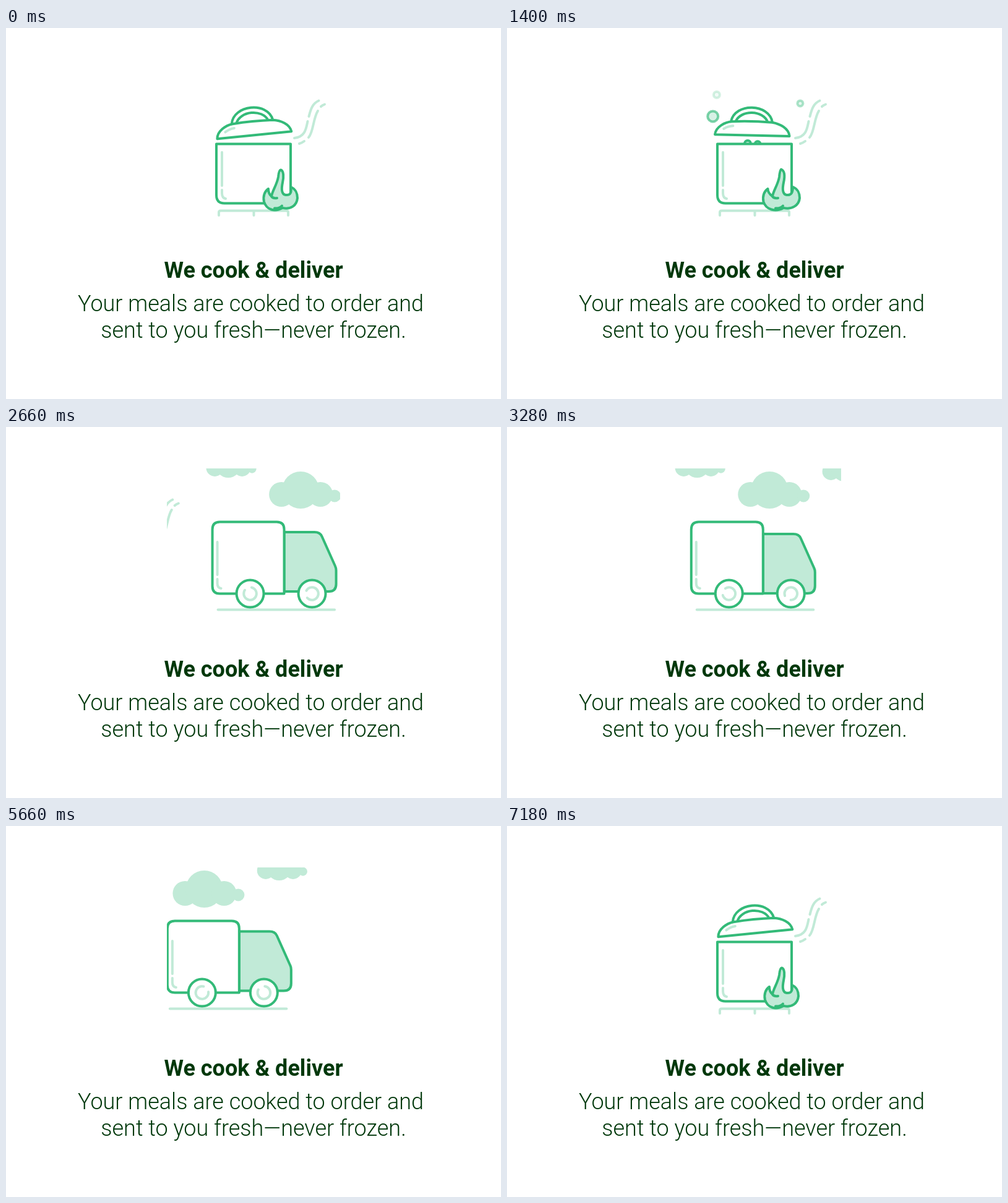
These frames come from a looping animation (800 by 600 pixels, 7200 ms). An HTML page with a canvas:

```html
<!DOCTYPE html>
<html lang="en">
<head>
<meta charset="utf-8">
<title>We cook &amp; deliver</title>
<style>
  html, body { margin: 0; width: 100%; height: 100%; overflow: hidden; background: #fff; }
  canvas, svg { position: absolute; left: 0; top: 0; width: 800px; height: 600px; }
  text { font: 300 36px Roboto, sans-serif; fill: #00380b; text-anchor: middle; }
  .title { font-weight: 700; }
</style>
</head>
<body>
<canvas id="stage" width="800" height="600"></canvas>
<svg viewBox="0 0 800 600">
  <text class="title" x="400" y="404">We cook &amp; deliver</text>
  <text x="395.5" y="458">Your meals are cooked to order and</text>
  <text x="400" y="501">sent to you fresh—never frozen.</text>
</svg>
<script>
const LOOP = 7200;
const DARK = '#33ba78', LIGHT = '#c1ead7', WHITE = '#fff';
const TAU = Math.PI * 2;
const ctx = document.getElementById('stage').getContext('2d');

const clamp = (v) => Math.max(0, Math.min(1, v));
const mix = (a, b, p) => a + (b - a) * p;
const quad = (a, b, c, p) => (1 - p) * (1 - p) * a + 2 * p * (1 - p) * b + p * p * c;

// Cubic bezier easing (.6, 0, .1, 1)
function ease(p) {
  p = clamp(p);
  let lo = 0, hi = 1;
  for (let i = 0; i < 24; i++) {
    const s = (lo + hi) / 2, r = 1 - s;
    if (1.8 * r * r * s + 0.3 * r * s * s + s * s * s < p) lo = s; else hi = s;
  }
  return lo * lo * (3 - 2 * lo);
}

function paint(path, stroke, fill) {
  if (fill) { ctx.fillStyle = fill; ctx.fill(path); }
  if (stroke) { ctx.strokeStyle = stroke; ctx.stroke(path); }
}
const shape = (d, stroke, fill) => paint(new Path2D(d), stroke, fill);

function disc(x, y, r, stroke, fill) {
  const p = new Path2D();
  p.arc(x, y, r, 0, TAU);
  paint(p, stroke, fill);
}

function at(x, y, draw, turn = 0) {
  ctx.save();
  ctx.translate(x, y);
  ctx.rotate(turn);
  draw();
  ctx.restore();
}

// start, life, rise, x from / via / to, radius
const bubbles = [
  [200, 1400, 98, 365, 252, 367, 5],
  [700, 1400, 98, 365, 308, 350, 8.5],
  [400, 1400, 98, 440, 483, 472, 4.5],
  [1330, 1400, 98, 390, 380, 360, 5],
  [1345, 600, 45, 404, 410, 412, 4.5],
  [6095, 1000, 75, 367, 352, 358, 8]
];

function drawBubbles(t) {
  for (const [start, life, rise, x0, x1, x2, r] of bubbles) {
    const p = (t - start) / life;
    if (p <= 0 || p >= 1) continue;
    ctx.globalAlpha = 1 - Math.pow(p, 1.5);
    disc(quad(x0, x1, x2, p), 192 - rise * p, r, DARK, LIGHT);
  }
  ctx.globalAlpha = 1;
}

function lidAngle(t) {
  if (t > 5000) return -5.7;
  if (t < 1400) return mix(-5.7, 1.3, t / 1400);
  return mix(1.3, 8, clamp((t - 1400) / 800));
}

function drawLid(t) {
  const a = lidAngle(t);
  const x = 395.5 + 2.5 * clamp((1.3 - a) / 7);
  at(x, 152, () => {
    shape('M-33.5 0C-28 -31 28 -31 33.5 0M-26 0C-18 -20 18 -20 26 0', DARK);
    shape('M-59 21.5C-58 9 -43 1 -32 0Q0 -2 33 0C46 2 60 9 61.5 21.5Z', DARK, WHITE);
    shape('M-45 12Q-38 7.5 -30 7', LIGHT);
  }, a * Math.PI / 180);
}

function drawFlame(t) {
  const w = (1 - Math.cos(TAU * t * 13 / LOOP)) / 2;
  const l = -2.5 * w, r = 2 * w;
  shape(`M${444 - w} ${229.5 - w}C449 231 449 241 447 250C445 260 445 269 452 270
    C460 271 462 265 ${460 + r} 257C${468 + r} 260 ${471 + r} 268 ${471 + r} 275
    C${470 + r} 287 460 294 447 291C434 298 ${421 + l} 294 ${417 + l} 281
    C${415 + l} 272 ${418 + l} 264 ${424 + l} 260C${424 + l} 267 426 270 429 272
    C431 262 438 253 440 241Q441 230 ${444 - w} ${229.5 - w}Z`, DARK, LIGHT);
  shape('M429 272Q431 276 438 275M434 291.5Q442 292 446 287.5', DARK);
}

function drawPot(t) {
  shape('M466 178C484 176 485 162 487.5 151M489.5 143C493 129 496 122 505.5 117.5', LIGHT);
  shape('M474 187Q478 186 482 183M489 177C497 168 496 147 504 134M509 127Q511 125 515 123.5', LIGHT);
  shape('M344 303V298Q344 295.5 347 295.5H453Q456 295.5 456 298V303M400.5 296V303', LIGHT);
  drawBubbles(t);
  drawLid(t);
  shape('M340 187.5H460V283.5H353Q340 283.5 340 270Z', DARK, WHITE);
  shape('M349 201V255M349 262V267Q349 275 355 276', LIGHT);
  drawFlame(t);
}

function drawCloud(x, y, s) {
  at(x, y, () => {
    ctx.scale(s, s);
    for (const [cx, cy, r] of [[-31, 7, 20], [0, 0, 30], [32, 7, 20], [55, 9.5, 10]])
      disc(cx, cy, r, null, LIGHT);
  });
}

function drawWheel(x, gap) {
  disc(x, 269.5, 22, DARK, WHITE);
  const ring = new Path2D();
  ring.arc(x, 269.5, 10.3, gap + 0.6, gap + TAU - 0.6);
  paint(ring, LIGHT);
}

function drawTruck(t) {
  const drift = (4760 - t) * 0.026;
  drawCloud(266 + drift, 61, 0.7);
  drawCloud(383 + drift, 102, 1);
  drawCloud(504 + drift, 67, 0.7);

  shape('M304 295.5H492.5', LIGHT);
  const sway = -5 * (1 - clamp((t - 3280) / 1400));
  const hop = 1.5 * (1 + Math.cos(TAU * (t - 3280) / 423));
  at(sway, hop, () => shape(
    'M416 170H465Q474 170 477 177L498.5 225Q500 228 500 232V254Q500 266 488 266H416Z', DARK, LIGHT));
  at(sway, 0, () => {
    shape('M312 153.5H404Q416 153.5 416 165.5V269.5H312Q300 269.5 300 257.5V165.5Q300 153.5 312 153.5Z', DARK, WHITE);
    shape('M308 186V239M308 246V253Q308 260 314 261', LIGHT);
  });

  const spin = (225 + (t - 4760) * 745 / 1480) * Math.PI / 180;
  drawWheel(356, spin);
  drawWheel(456, spin - 75 * Math.PI / 180);
}

function drawStreak(t) {
  const x = 540 - (t - 4716) * 0.5;
  if (x < 540 && x > 200) shape(`M${x + 2} 125H${x + 58}`, DARK);
}

function render(t) {
  ctx.clearRect(0, 0, 800, 600);
  ctx.save();
  ctx.beginPath();
  ctx.rect(260, 67, 280, 280);
  ctx.clip();
  ctx.lineWidth = 4;
  ctx.lineCap = ctx.lineJoin = 'round';

  const enter = ease((t - 1520) / 2080);
  const leave = ease((t - 5120) / 1980);
  if (t > 1500) at(247 * (1 - enter) - 280 * leave, 0, () => drawTruck(t));
  drawStreak(t);
  at(t < 4000 ? -280 * enter : 280 * (1 - leave), 0, () => drawPot(t));
  ctx.restore();
}

const begin = performance.now();
function tick() {
  render((performance.now() - begin) % LOOP);
  requestAnimationFrame(tick);
}
tick();
</script>
</body>
</html>
```
